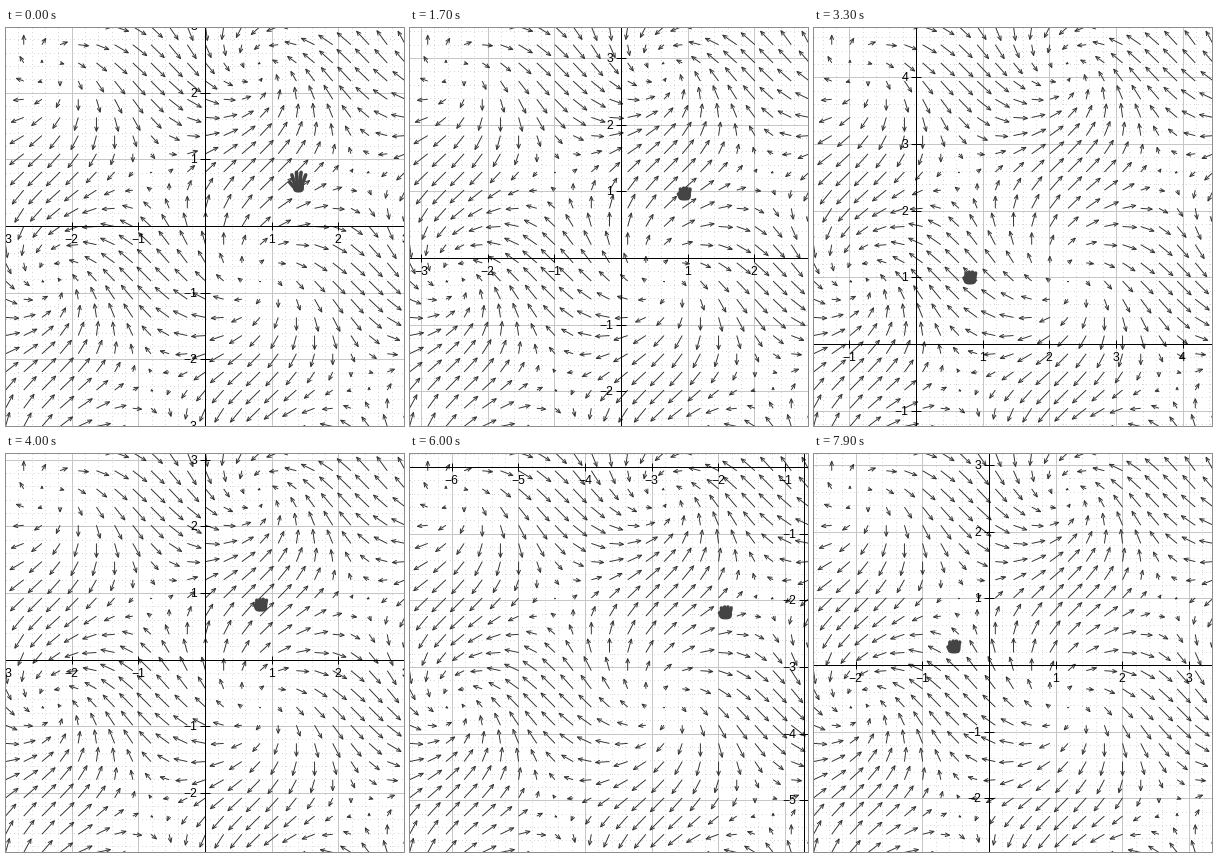
Animation of 398x398 px, one loop 8000 ms. Source, as a matplotlib script:

```python
import numpy as np
import matplotlib.pyplot as plt
from matplotlib.animation import FuncAnimation
from matplotlib.collections import LineCollection
from matplotlib.patches import Polygon

SIZE, UNIT, PX = 398, 66.65, 0.72  # PX: points per pixel at 100 dpi
STEP = 100
DARK, HAND = "#303030", "#444444"
HOME = np.array([199.5, 198.5])

# Key points of the dragged origin: time, x, y
ORIGIN = [(1200, *HOME), (1700, 211.5, 230.5), (2400, 108.5, 308.5), (2800, 108.5, 308.5),
          (3300, 102.5, 316.5), (4700, 296.5, 95.5), (5200, 296.5, 95.5),
          (6000, 442, 13.5), (6900, 264.5, 98.5), (7300, 264.5, 98.5), (7900, 175.5, 211.5)]
# Hand relative to the origin: time, dx, dy
GRIP = [(600, 92.5, -45), (1100, 65, -65), (3300, 53.5, -67.5), (4800, 57.5, -41.5),
        (5200, -124, 138), (6900, -129.5, 152), (7300, -35.5, -19.5)]
FREE = [(0, 1300), (4600, 5300), (7000, 7400)]  # times with an open hand

fig = plt.figure(figsize=(SIZE / 100, SIZE / 100), dpi=100, facecolor="white")
ax = fig.add_axes([0, 0, 1, 1])
ax.set(xlim=(0, SIZE), ylim=(SIZE, 0))
ax.axis("off")


def line_set(color, width, zorder, snap=False, **style):
    lines = LineCollection([], colors=color, linewidths=width * PX, zorder=zorder, **style)
    lines.set_snap(snap)
    return ax.add_collection(lines, autolim=False)


def field_segments():
    """Arrows of (sin(x+y), cos(x-y)) on a grid from -3 to 3, fixed to the stage."""
    x, y = (a.ravel() for a in np.meshgrid(*[np.linspace(-3, 3, 23)] * 2))
    tail = HOME + UNIT * np.column_stack([x, -y])
    vec = 14 * np.column_stack([np.sin(x + y), -np.cos(x - y)])
    tip = tail + vec
    length = np.hypot(*vec.T)[:, None]
    along = vec / np.maximum(length, 1e-6)
    across = along[:, ::-1] * (-1, 1)
    head = np.minimum(4.5, length)
    barbs = [tip - head * (along + side * across) for side in (-0.42, 0.42)]
    shafts = np.stack([tail, tip], axis=1)
    return [*shafts, *np.stack([barbs[0], tip, barbs[1]], axis=1)]


def hand_shape(is_open):
    """Palm outline and finger lines around the hand's centre."""
    angle = np.linspace(0, 2 * np.pi, 40)
    round_box = np.column_stack([np.sign(f) * np.abs(f) ** 0.7
                                 for f in (np.cos(angle), np.sin(angle))])
    spread, reach, curve = (11.5, 9.5, 8) if is_open else (8, 5, 3)
    lines = [[(0.5 + 6 * a, 3), (0.8 + spread * a, -reach + curve * a * a)]
             for a in np.linspace(-0.6, 0.6, 4)]
    if is_open:
        return round_box * (5.5, 5.5) + (0.5, 5.5), lines + [[(-3, 7), (-8.5, 0.5)]]
    return round_box * (6.5, 5.5) + (0, 2), lines + [[(-4, 4), (-6, 1)]]


line_set(DARK, 0.95, 3).set_segments(field_segments())
minor = line_set("#d8d8d8", 1, 1, linestyles=[(0, (1, 3))])
major = line_set("#c6c6c6", 1, 2)
axes_lines = line_set("black", 1, 4)
fingers = line_set(HAND, 3.6, 6, capstyle="round")
palm = ax.add_patch(Polygon([(0, 0)] * 3, facecolor=HAND, edgecolor="none", zorder=6))
font = dict(family="Liberation Sans", size=12.3 * PX, color="black", va="center", zorder=5)
x_labels = [ax.text(0, 0, "", ha="center", **font) for _ in range(8)]
y_labels = [ax.text(0, 0, "", ha="right", **font) for _ in range(8)]


def tween(keys, t):
    """Eased position between timed key points."""
    times, *coords = np.array(keys).T
    place = np.interp(t, times, np.arange(len(times)))
    i, s = divmod(place, 1)
    eased = i + s * s * (3 - 2 * s)
    return np.array([np.interp(eased, np.arange(len(times)), c) for c in coords])


def snap(v):
    return np.floor(v) + 0.5


def indices(origin, step):
    """Line numbers, left to right or top to bottom, visible on the stage."""
    return np.arange(np.ceil((-8 - origin) / step), np.floor((SIZE + 8 - origin) / step) + 1)


def grid(origin, step, skip=0):
    columns, rows = indices(origin[0], step), indices(origin[1], step)
    if skip:
        columns, rows = columns[columns % skip != 0], rows[rows % skip != 0]
    return ([[(x, 0), (x, SIZE)] for x in snap(origin[0] + step * columns)]
            + [[(0, y), (SIZE, y)] for y in snap(origin[1] + step * rows)])


def place_labels(labels, origin, sign, position):
    numbers = [int(n) for n in indices(origin, UNIT) if n]
    for label in labels:
        label.set_text("")
    for label, n in zip(labels, numbers):
        label.set_text(str(sign * n).replace("-", "\u2212"))
        label.set_position(position(origin + n * UNIT))
    return [snap(origin + n * UNIT) for n in numbers]


def update(frame):
    t = frame * STEP
    origin = tween(ORIGIN, t)
    minor.set_segments(grid(origin, UNIT / 5, skip=5))
    major.set_segments(grid(origin, UNIT))

    # Axes stay at the edge when the origin leaves the stage.
    vx, vy = snap(np.clip(origin, 3.5, SIZE - 3.5))
    x_ticks = place_labels(x_labels, origin[0], 1, lambda x: (x - 0.5, vy + 13.5))
    y_ticks = place_labels(y_labels, origin[1], -1, lambda y: (vx - 8.5, y + 0.5))
    axes_lines.set_segments(
        [[(vx, 0), (vx, SIZE)], [(0, vy), (SIZE, vy)]]
        + [[(x, vy - 4), (x, vy + 4)] for x in x_ticks]
        + [[(vx - 5, y), (vx + 5, y)] for y in y_ticks])

    outline, lines = hand_shape(any(start <= t < end for start, end in FREE))
    at = origin + tween(GRIP, t)
    palm.set_xy(outline + at)
    fingers.set_segments(np.array(lines) + at)
    return []


anim = FuncAnimation(fig, update, frames=80, interval=STEP, repeat=True, repeat_delay=0,
                     blit=False)
plt.show()
```
